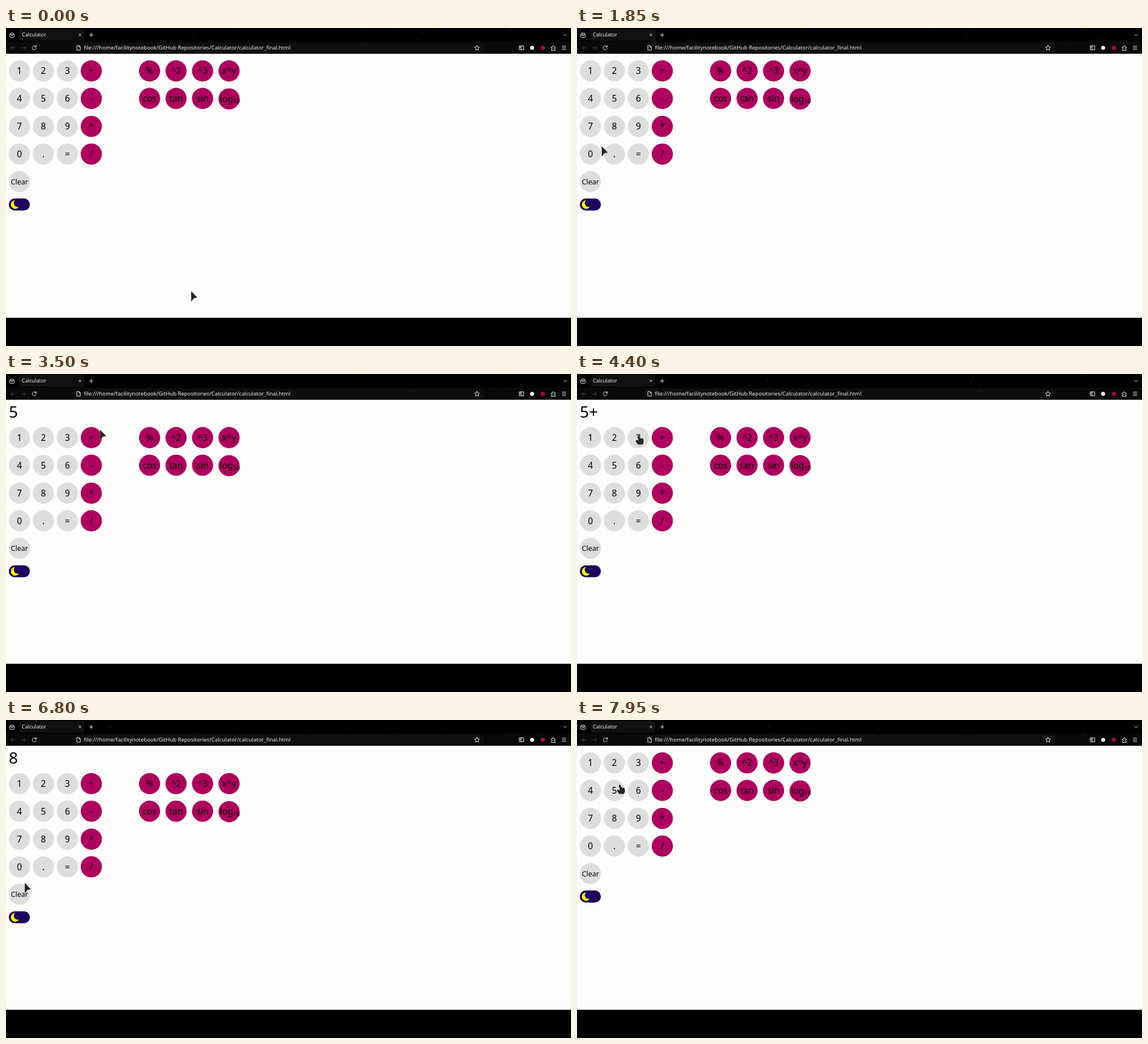
Recreate the animation shown at these times as an HTML page. Size 998 px wide and 561 px high, loop 8 s.

```html
<!DOCTYPE html>
<html lang="en">
<head>
<meta charset="utf-8">
<title>Calculator</title>
<style>
html, body { margin: 0; width: 100%; height: 100%; overflow: hidden; background: #000; }
svg { display: block; width: 100%; height: 100%; font-family: "Noto Sans", "Open Sans", sans-serif; }
.line { fill: none; stroke: #e4e4e8; stroke-width: 1; stroke-linecap: round; stroke-linejoin: round; }
.dim { stroke: #4c4c52; }
.ui { fill: #f0f0f2; }
</style>
</head>
<body>
<svg id="stage" viewBox="0 0 998 561">
  <rect width="998" height="561"/>
  <g id="stars" fill="#fff"></g>

  <rect x="24" y="2" width="114.500" height="20.500" rx="2.500" fill="#111114"/>
  <rect y="24" width="998" height="22" fill="#09090b"/>
  <rect x="120" y="26.500" width="724" height="17" rx="2.500" fill="#101013"/>

  <path class="line" d="M6.500 11.500h8v4q0 1-1 1h-6q-1 0-1-1zM7 11.300l1-2.300h5l1 2.300M9 13.500h3"/>
  <text class="ui" x="28" y="15.400" font-size="9.060">Calculator</text>
  <path class="line" d="M128.800 10.300l3.600 3.600m0-3.600l-3.600 3.600M147.500 12.300h6m-3-3v6M984.700 11l2.800 2.700 2.800-2.700"/>
  <path class="line dim" d="M16 35H8.700m3.200-3.200L8.700 35l3.200 3.200M27.500 35h7.300m-3.200-3.200l3.200 3.200-3.200 3.200"/>
  <path class="line" d="M53 33a3.600 3.600 0 1 0 .4 3M53.500 30.800v2.700h-2.700"/>
  <path class="line" d="M125.500 31h3.500l2.300 2.300v5.700h-5.800zM129 31v2.400h2.300"/>
  <text class="ui" x="137.500" y="38.300" font-size="9.550">file:///home/facilitynotebook/GitHub Repositories/Calculator/calculator_final.html</text>
  <path class="line" d="M832 30.800l1.300 2.700 3 .4-2.200 2.100.5 3-2.600-1.400-2.600 1.400.5-3-2.200-2.100 3-.4z"/>
  <path class="line" d="M907 31.500h7.500v7H907zM909.800 31.500v7M907.800 33.500h1.300m-1.300 1.700h1.300"/>
  <circle cx="929.300" cy="35" r="3.600" fill="#eee"/>
  <circle cx="948.300" cy="35" r="3.800" fill="#a5121c"/>
  <path class="line" d="M963.500 33.500h2v-1a1.300 1.300 0 0 1 2.600 0v1h2v2h-1a1.200 1.200 0 0 0 0 2.300h1v1.700h-6.600v-2h.8a1.200 1.200 0 0 0 0-2.300h-.8z"/>
  <path class="line" d="M982.500 32h6.500m-6.500 3h6.500m-6.500 3h6.500"/>

  <rect y="45.500" width="998" height="465.700" fill="#fdfdfb"/>
  <text id="display" x="5" y="76.800" font-size="28.100"></text>
  <g id="pad">
    <rect x="5" y="300.800" width="37.200" height="21.200" rx="10.600" fill="#20005e"/>
    <circle cx="16.200" cy="311.500" r="7.600" fill="#ffff00"/>
    <circle cx="20.600" cy="308.800" r="6.900" fill="#20005e"/>
  </g>
  <path id="arrow" fill="#262626" stroke="#fff" stroke-opacity=".35" stroke-width=".7" d="M0 0L11.300 11.700 5.400 12.500 0 19z"/>
  <path id="hand" fill="#262626" stroke="#fff" stroke-opacity=".25" stroke-width=".6"
    d="M-1.800 1Q-.8-.5.700.5L2.900 5.300 6.500 5.600Q8.500 6 8.600 8L8.700 12.500 7 16.500H-1.500L-5.500 10.700Q-6 8.700-4.200 8.700L-1.500 10.300-.6 8.600-2.200 3z"/>
</svg>
<script>
const LOOP = 8000, STEP = 50, SHIFT = 36.6, R = 18.7;
const $ = id => document.getElementById(id);

function add(parent, tag, attrs, text = "") {
  const el = document.createElementNS("http://www.w3.org/2000/svg", tag);
  for (const key in attrs) el.setAttribute(key, attrs[key]);
  el.textContent = text;
  parent.appendChild(el);
  return el;
}

const rows = [75.7, 124.3, 173.6, 222.4, 271];
const buttons = [];

function addButton(label, x, y, fill, size = 15.6) {
  add($("pad"), "circle", { cx: x, cy: y, r: R, fill });
  const isLog = label === "log";
  add($("pad"), "text", {
    x: isLog ? 389.6 : x, y: y + size * 0.37, "font-size": size, "text-anchor": "middle"
  }, label);
  if (isLog) add($("pad"), "text", { x: 400.8, y: y + 8.2, "font-size": 10.8 }, "10");
  buttons.push({ x, y });
}

["123+", "456-", "789*", "0.=/"].forEach((keys, row) =>
  [...keys].forEach((key, col) =>
    addButton(key, [23.7, 66, 108.4, 150.7][col], rows[row], col < 3 ? "#dddddd" : "#ae005e")));
[["%", "^2", "^3", "x^y"], ["cos", "tan", "sin", "log"]].forEach((keys, row) =>
  keys.forEach((key, col) =>
    addButton(key, [253.6, 300.4, 347.2, 394][col], rows[row] + (key === "log" ? 0.8 : 0), "#ae005e")));
addButton("Clear", 23.7, rows[4], "#dddddd", 12.5);

// Seeded stars drifting behind the tab strip
let seed = 7;
const rand = () => (seed = seed * 16807 % 2147483647) / 2147483647;
const stars = Array.from({ length: 34 }, () => ({
  x: rand() * 998, y: rand() * 23, speed: (rand() - 0.5) * 0.008, phase: rand() * 6.28,
  el: add($("stars"), "circle", { r: 0.4 + rand() * 0.35 })
}));

// Pointer stops: time, x, y
const path = [
  [0, 327, 464], [150, 318, 455], [750, 62, 290], [950, 34, 268], [1400, 34, 268],
  [1750, 42, 215], [2350, 62, 123], [2950, 62, 123], [3350, 169, 96], [3500, 166, 98],
  [3750, 153, 108], [4050, 153, 108], [4350, 109, 108], [4700, 109, 108], [5100, 107, 256],
  [5350, 107, 254], [5650, 107, 254], [5950, 70, 300], [6300, 48, 310], [6800, 33, 287],
  [7000, 28, 299], [7350, 28, 299], [7700, 35, 203], [7950, 76, 114], [8000, 76, 114]
];
const readings = [[0, ""], [2850, "5"], [3950, "5+"], [4600, "5+3"], [5550, "8"], [7250, ""]];

function pointerAt(t) {
  const i = Math.max(1, path.findIndex(p => p[0] > t));
  const [t0, x0, y0] = path[i - 1], [t1, x1, y1] = path[i];
  const k = (t - t0) / (t1 - t0), e = k * k * (3 - 2 * k);
  return [x0 + (x1 - x0) * e, y0 + (y1 - y0) * e];
}

function draw(t) {
  const text = readings.filter(r => r[0] <= t).pop()[1];
  const shift = text ? SHIFT : 0;
  $("display").textContent = text;
  $("pad").setAttribute("transform", `translate(0 ${shift})`);

  const [x, y] = pointerAt(t);
  const over = buttons.some(b => Math.hypot(x - b.x, y - b.y - shift) < R);
  for (const [id, on] of [["arrow", !over], ["hand", over]]) {
    $(id).setAttribute("transform", `translate(${x} ${y})`);
    $(id).style.display = on ? "" : "none";
  }

  for (const s of stars) {
    s.el.setAttribute("cx", s.x + s.speed * t);
    s.el.setAttribute("cy", s.y);
    s.el.setAttribute("opacity", 0.2 + 0.15 * Math.sin(s.phase + t / 700));
  }
}

function tick(now) {
  draw(Math.floor(now % LOOP / STEP) * STEP);
  requestAnimationFrame(tick);
}
draw(0);
requestAnimationFrame(tick);
</script>
</body>
</html>
```
